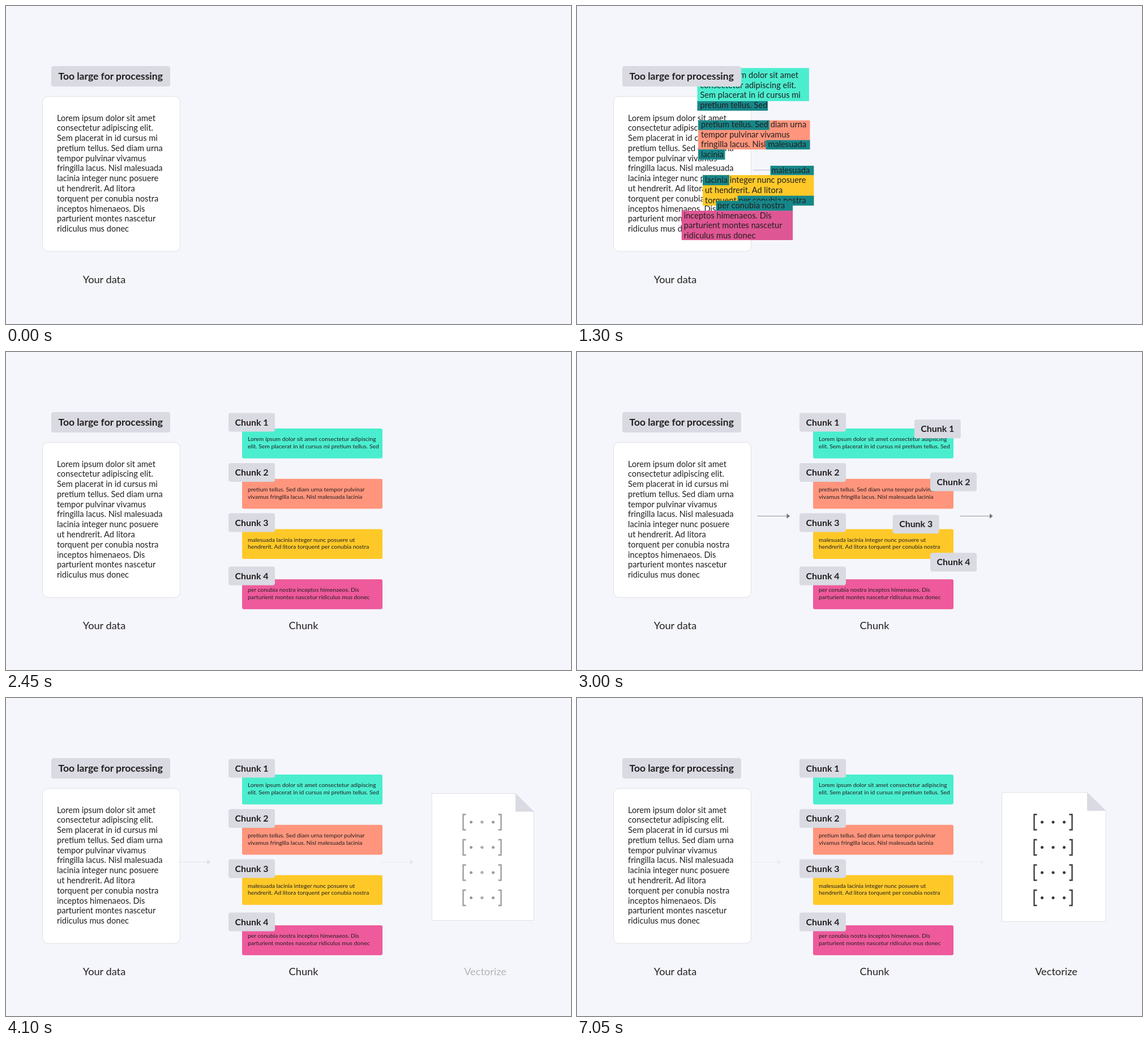
These frames come from a looping animation (998 px wide and 561 px high, 7.1 s). An HTML page:

```html
<!DOCTYPE html>
<html lang="en">
<head>
<meta charset="utf-8">
<title>Chunk and vectorize</title>
<style>
  html, body { margin: 0; width: 100%; height: 100%; overflow: hidden; background: #f5f6fb; }
  svg { display: block; width: 100%; height: 100%; }
  text { font-family: Lato, "Open Sans", sans-serif; fill: #231f20; white-space: pre; }
  .body { font-size: 14.65px; }
  .small { font-size: 10.35px; }
  .bold { font-weight: 700; }
  .caption { font-size: 18.2px; text-anchor: middle; }
</style>
</head>
<body>
<svg id="stage" viewBox="0 0 998 561"></svg>
<script>
const LOOP = 7100;
const GREY = '#d9dae2', EDGE = '#dfe0e6', TEAL = '#168789';
const stage = document.getElementById('stage');

// Drawing helpers
function add(parent, tag, attrs = {}, text) {
  const el = document.createElementNS('http://www.w3.org/2000/svg', tag);
  for (const key in attrs) el.setAttribute(key, attrs[key]);
  if (text !== undefined) el.textContent = text;
  return parent.appendChild(el);
}
const group = () => add(stage, 'g');
const box = (parent, x, y, x2, y2, fill, rx = 0) =>
  add(parent, 'rect', { x, y, width: x2 - x, height: y2 - y, fill, rx });
const write = (parent, cls, x, y, text) => add(parent, 'text', { class: cls, x, y }, text);
const fade = (el, o) => {
  el.setAttribute('opacity', o);
  el.setAttribute('display', o > 0 ? 'inline' : 'none');
};
const place = (el, x, y, s = 1) => el.setAttribute('transform', `translate(${x} ${y}) scale(${s})`);

// Timing helpers
const span = (t, start, end) => Math.min(1, Math.max(0, (t - start) / (end - start)));
const inOut = p => p < 0.5 ? 4 * p ** 3 : 1 - 4 * (1 - p) ** 3;
const out = p => 1 - (1 - p) ** 3;
const backOut = p => 1 + 2.7 * (p - 1) ** 3 + 1.7 * (p - 1) ** 2;
const curve = (u, a, b) => 3 * a * u * (1 - u) ** 2 + 3 * b * u * u * (1 - u) + u ** 3;
function ease(p) {
  let lo = 0, hi = 1;
  for (let i = 0; i < 20; i++) {
    const mid = (lo + hi) / 2;
    if (curve(mid, 0.25, 0.25) < p) lo = mid; else hi = mid;
  }
  return curve(lo, 0.1, 1);
}

const lines = [
  'Lorem ipsum dolor sit amet', 'consectetur adipiscing elit.',
  'Sem placerat in id cursus mi', 'pretium tellus. Sed diam urna',
  'tempor pulvinar vivamus', 'fringilla lacus. Nisl malesuada',
  'lacinia integer nunc posuere', 'ut hendrerit. Ad litora',
  'torquent per conubia nostra', 'inceptos himenaeos. Dis',
  'parturient montes nascetur', 'ridiculus mus donec'
];
const bodyLine = (parent, row, text = lines[row], x = 90) =>
  write(parent, 'body', x, 202.6 + row * 17.77, text);

// Source document
add(stage, 'rect', { x: 64.5, y: 159.5, width: 243, height: 273.5, rx: 10, fill: '#fff', stroke: EDGE });
lines.forEach((_, row) => bodyLine(stage, row));
write(stage, 'caption', 173.5, 489, 'Your data');

// Arrows
const arrows = [0, 358.5].map(dx => {
  const g = group();
  add(g, 'path', { d: 'M0 289.5H53', stroke: '#707075', 'stroke-width': 1 });
  add(g, 'path', { d: 'M52 285L57.5 289.5L52 294Z', fill: '#444' });
  return { g, dx };
});

// Chunk cards
const chunks = [
  { fill: '#4aeecf', tagY: 124, rowY: 219, bend: 3, lag: 24,
    text: ['Lorem ipsum dolor sit amet consectetur adipiscing', 'elit. Sem placerat in id cursus mi pretium tellus. Sed'] },
  { fill: '#ff957c', tagY: 212.5, rowY: 263.5, bend: 2, lag: -18,
    text: ['pretium tellus. Sed diam urna tempor pulvinar', 'vivamus fringilla lacus. Nisl malesuada lacinia'] },
  { fill: '#fec928', tagY: 301, rowY: 308, bend: 1, lag: 75,
    text: ['malesuada lacinia integer nunc posuere ut', 'hendrerit. Ad litora torquent per conubia nostra'] },
  { fill: '#ee5a9c', tagY: 395, rowY: 352.5, bend: 1, lag: -18,
    text: ['per conubia nostra inceptos himenaeos. Dis', 'parturient montes nascetur ridiculus mus donec'] }
];
const cards = group();
chunks.forEach((c, i) => {
  const y = 135 + i * 88.7;
  box(cards, 417, y, 665, y + 52.7, c.fill, 3);
  c.text.forEach((line, n) => write(cards, 'small', 427, y + 22.2 + n * 12.6, line));
});
const chunkCaption = write(stage, 'caption', 525.5, 489, 'Chunk');

// Highlighted pieces: marks are [x, y, x2, y2, fill], rows are [row, text, x]
const pieces = [
  { cy: 223, start: 897, dx: 351.5, dy: -211, drop: 213,
    marks: [[85, 185, 283, 243.5, '#4aeecf'], [85, 243.5, 210, 260.5, TEAL]],
    rows: [[0], [1], [2], [3, 'pretium tellus. Sed']] },
  { cy: 278, start: 890, dx: 338, dy: -111, drop: 120,
    marks: [[85, 243.5, 283, 295, '#ff957c'], [85, 243.5, 211, 260.5, TEAL],
      [205, 278.5, 283, 295, TEAL], [85, 295, 132.5, 313, TEAL]],
    rows: [[3], [4], [5], [6, 'lacinia']] },
  { cy: 313.5, start: 884, dx: 341, dy: 8, drop: 13,
    marks: [[86, 295, 283, 349, '#fec928'], [206, 278.5, 283, 295, TEAL],
      [86, 295, 133, 313, TEAL], [148, 331.5, 283, 349, TEAL]],
    rows: [[5, 'malesuada', 208], [6], [7], [8]] },
  { cy: 366, start: 933, dx: 360, dy: 44, drop: 21,
    marks: [[86, 349, 283, 401, '#df5694'], [147, 331.5, 283, 349, TEAL]],
    rows: [[8, 'per conubia nostra', 149.5], [9], [10], [11]] }
];
for (const p of pieces) {
  p.g = group();
  const inner = add(p.g, 'g', { transform: `translate(-184 ${-p.cy})` });
  p.marks.forEach(m => box(inner, ...m));
  p.rows.forEach(r => bodyLine(inner, ...r));
}

box(stage, 80, 106, 290, 142, GREY, 4);
add(stage, 'text', { class: 'bold', x: 92.5, y: 129.5, 'font-size': 17.5 }, 'Too large for processing');

// Vector page
const page = group();
add(page, 'path', { d: 'M-91.5 -114H59L92 -81.5V114H-91.5Z', fill: '#fff', stroke: EDGE });
add(page, 'path', { d: 'M59 -114L92 -81.5H59Z', fill: GREY });
const vectors = group();
for (const { rowY: y } of chunks) {
  add(vectors, 'path', {
    d: `M812.5 ${y - 13.5}H807.5V${y + 13.5}H812.5M869.5 ${y - 13.5}H874.5V${y + 13.5}H869.5`,
    fill: 'none', stroke: '#3a3f45', 'stroke-width': 2.4
  });
  [821.5, 841, 860.5].forEach(cx => add(vectors, 'circle', { cx, cy: y, r: 2.5, fill: '#33383e' }));
}
const vectorCaption = write(stage, 'caption', 846.5, 489, 'Vectorize');

// Chunk tags, each with a copy that flies to the page
function makeTag(i) {
  const g = group();
  box(g, -41, -16.5, 41, 16.5, GREY, 4);
  add(g, 'text', { class: 'bold', x: -29.5, y: 5.6, 'font-size': 15.9 }, `Chunk ${i + 1}`);
  return g;
}
chunks.forEach((c, i) => { c.tag = makeTag(i); });
chunks.forEach((c, i) => { c.copy = makeTag(i); });

function draw(t) {
  // Arrow pulse every 1.5 s; the second one joins from the second pulse
  const phase = ((t - 1010) % 1500) / 1330;
  arrows.forEach(({ g, dx }, i) => {
    const on = t > 1010 + i * 1500 && phase < 1;
    const glow = 1 - Math.abs(2 * phase - 1);
    fade(g, on ? (i && phase < 0.15 ? glow * 0.65 : glow) : 0);
    if (on) place(g, 302 + dx + 26 * ease(phase), 0);
  });

  const shrink = 0.75 * inOut(span(t, 1265, 1620));
  for (const p of pieces) {
    const e = inOut(span(t, p.start, p.start + 900));
    place(p.g, 184 + p.dx * e, p.cy + p.dy * e + p.drop * shrink, 1 - shrink);
    fade(p.g, span(t, 25, 750) * (1 - span(t, 1700, 1850)));
  }

  fade(cards, span(t, 1550, 1850));
  fade(chunkCaption, span(t, 1800, 2400));

  const pop = backOut(span(t, 1615, 2400));
  const sink = 1 - 0.94 * inOut(span(t, 3550, 4150));
  for (const c of chunks) {
    place(c.tag, 434, c.tagY, Math.max(0, pop));
    fade(c.tag, t > 1615 ? 1 : 0);
    const e = ease(span(t, 2640 + c.lag, 3790 + c.lag));
    place(c.copy, 434 + 406 * e, c.tagY + (c.rowY - c.tagY) * e ** c.bend, sink);
    fade(c.copy, t > 2600 && t < 4200 ? 1 : 0);
  }

  place(page, 842, 280.5, 0.8 + 0.2 * out(span(t, 3790, 4350)));
  fade(page, span(t, 3770, 3980));
  fade(vectors, span(t, 3930, 4270));
  fade(vectorCaption, span(t, 3900, 4560));
}

const begin = performance.now();
function tick() {
  draw((performance.now() - begin) % LOOP);
  requestAnimationFrame(tick);
}
tick();
</script>
</body>
</html>
```
